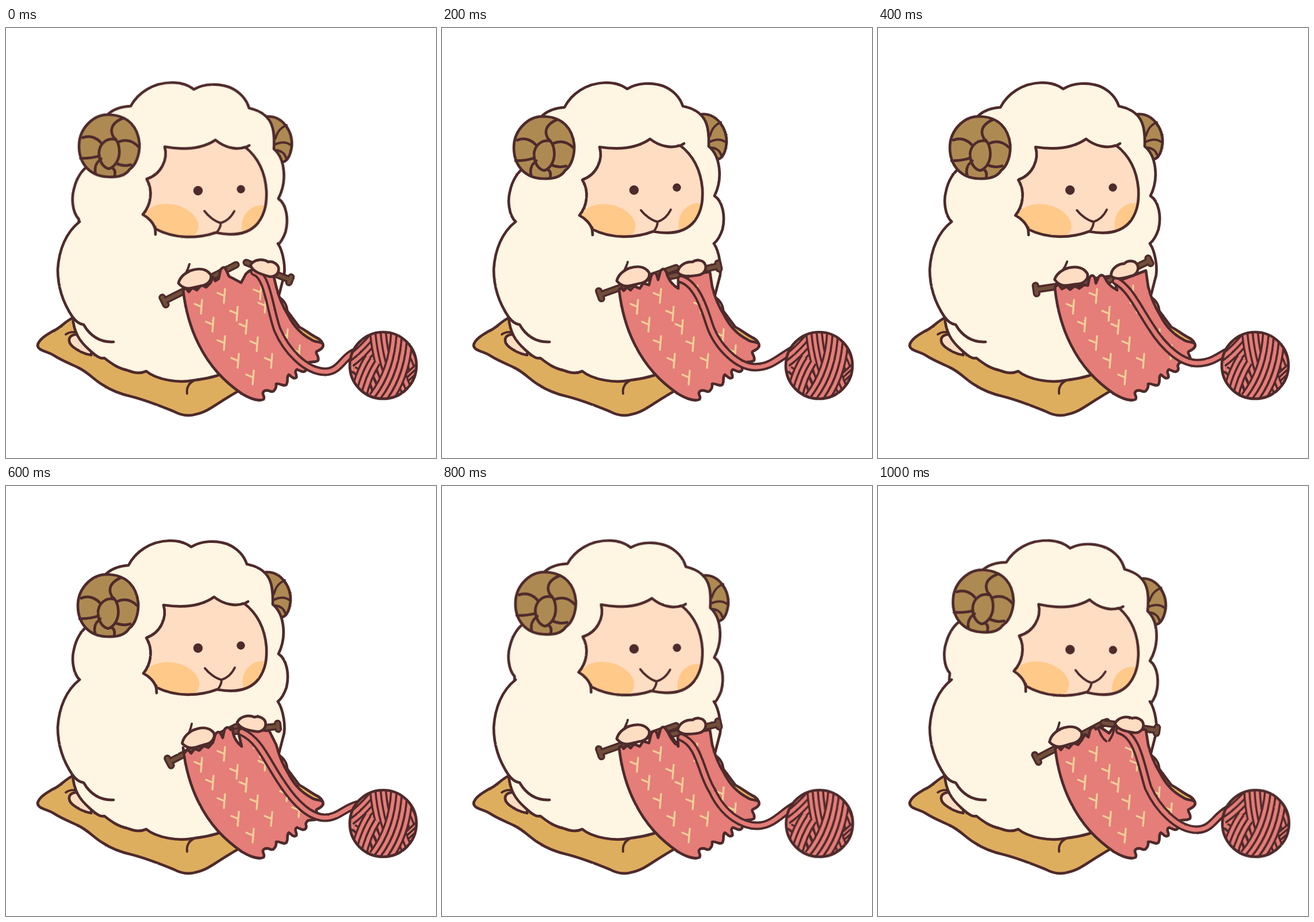
An HTML page that plays this animation: 748x748 px, repeating every 1200 ms.

```html
<!DOCTYPE html>
<html lang="en">
<head>
<meta charset="utf-8">
<title>Knitting sheep</title>
<style>
html, body { margin: 0; width: 100%; height: 100%; overflow: hidden; background: #fff; }
svg { display: block; width: 100%; height: 100%; }
.ink { stroke: #4e2a2b; stroke-width: 4.7; stroke-linecap: round; stroke-linejoin: round; fill: none; }
.wool { fill: #fff5e3; }
.skin { fill: #ffddc3; }
.horn { fill: #ae8a53; }
.mat { fill: #deae5f; }
.knit { fill: #e57d78; }
.dot { fill: #4e2a2b; }
.blush { fill: #ffc98a; }
.thin { stroke-width: 3.9; }
.stitch { fill: none; stroke: #f0cf98; stroke-width: 3.4; stroke-linecap: round; }
.rod, .yarn { fill: none; stroke-linecap: round; stroke-linejoin: round; }
.rod { stroke: #704f3a; stroke-width: 6; }
.rod.edge { stroke: #4e2a2b; stroke-width: 13; }
.yarn { stroke: #e57d78; stroke-width: 7; }
.yarn.edge { stroke: #4e2a2b; stroke-width: 15; }
.head { transform-origin: 295px 285px; animation: tilt 1.2s step-end infinite; }
.ball { transform-origin: 656px 587px; animation: nudge 1.2s step-end infinite; }
.pose { visibility: hidden; animation: show 1.2s step-end infinite; }
@keyframes tilt {
  0% { transform: rotate(1.5deg); }
  16.6667% { transform: rotate(0deg); }
  66.6667% { transform: rotate(2deg); }
  83.3333%, 100% { transform: rotate(3.9deg); }
}
@keyframes nudge {
  0% { transform: none; }
  66.6667% { transform: translate(.6px, 0) rotate(1.5deg); }
  83.3333%, 100% { transform: translate(1px, 0) rotate(2.5deg); }
}
@keyframes show {
  0% { visibility: visible; }
  16.6667%, 100% { visibility: hidden; }
}
</style>
</head>
<body>
<svg viewBox="0 0 748 748">
  <defs>
    <filter id="rough" x="0" y="0" width="748" height="748" filterUnits="userSpaceOnUse" color-interpolation-filters="sRGB">
      <feTurbulence type="fractalNoise" baseFrequency=".25" numOctaves="2" seed="4"/>
      <feDisplacementMap in="SourceGraphic" scale="1.6" xChannelSelector="R" yChannelSelector="G"/>
    </filter>
    <path id="face" d="M274 207C281 230 268 256 244 264C257 285 252 310 239 326C249 331 258 340 261 350C295 367 335 366 367 354C400 360 425 355 440 335C452 318 454 300 453 280C450 245 435 220 414 204C400 210 378 206 362 193C335 212 300 211 274 207Z"/>
    <clipPath id="faceClip"><use href="#face"/></clipPath>
    <clipPath id="ballClip"><circle cx="656" cy="587" r="57"/></clipPath>
    <path id="stitch" class="stitch" d="M-10 -3L2 2M3 -10L1 14"/>
    <g id="leftHand">
      <path class="ink skin" d="M304 440C306 431 314 423 325 418C340 413 353 415 360 425C363 433 356 442 346 444C330 446 318 456 304 440Z"/>
      <path class="ink thin" d="M317 422Q321 415 323 407"/>
    </g>
    <path id="rightHand" class="ink skin" d="M410 425C412 412 425 406 436 407C442 402 455 403 458 412C461 420 455 429 445 430C432 432 418 434 410 425Z"/>
  </defs>

  <g filter="url(#rough)">
    <!-- cushion and foot -->
    <path class="ink mat" d="M118 503C100 512 95 522 82 527C72 533 57 541 55 552C56 562 72 562 84 570C98 579 110 583 124 590C142 598 152 611 167 620C185 632 200 637 218 641C245 648 270 658 292 667C305 674 317 676 330 672C350 668 365 655 385 643C430 615 500 580 548 556C553 549 550 545 543 540C530 534 522 526 510 520L480 480Z"/>
    <path class="ink thin" d="M104 533Q111 528 119 529"/>
    <path class="ink skin" d="M125 533C107 533 106 546 117 555C126 562 136 567 148 569L150 545Z"/>

    <!-- wool -->
    <g class="head">
      <path class="ink horn" d="M450 150C478 147 496 175 495 200C493 218 487 229 476 229L450 210Z"/>
      <path class="ink thin" d="M485 164C472 170 469 178 466 188M494 199Q482 190 466 198M486 222Q482 209 468 208"/>
      <path class="ink wool" d="M128 352L128 337C116 325 114 300 118 285C122 265 132 250 143 243L175 152C185 143 197 139 213 138C225 115 250 96 285 95C300 95 313 99 322 106C340 95 365 94 385 101C402 108 414 121 419 136C440 140 456 151 461 170C465 185 464 195 464 206C484 222 489 262 474 292C489 302 493 328 488 350C484 362 479 370 473 375"/>
    </g>
    <path class="ink wool" d="M473 375C482 388 488 420 482 437L474 468C485 474 490 485 489 497L385 598C370 605 350 610 325 613C300 618 262 612 244 597C235 601 225 601 213 596C195 592 185 585 171 574C165 576 158 572 145 560C128 545 118 530 116 503C99 478 90 450 90 420C92 385 105 355 128 337"/>
    <path class="ink" d="M116 503Q125 515 135 516C146 535 162 547 187 546"/>
    <path class="ink thin" d="M328 613Q313 620 315 636"/>

    <!-- face and near horn -->
    <g class="head">
      <use href="#face" class="skin"/>
      <g clip-path="url(#faceClip)" class="blush">
        <ellipse cx="289" cy="339" rx="48" ry="32" transform="rotate(12 289 339)"/>
        <ellipse cx="441" cy="338" rx="29" ry="34" transform="rotate(20 441 338)"/>
      </g>
      <use href="#face" class="ink"/>
      <path class="ink" d="M261 347L262 360M414 205L421 201"/>
      <circle class="dot" cx="334" cy="282" r="8.2"/>
      <circle class="dot" cx="408.5" cy="277.5" r="7.2"/>
      <path class="ink thin" d="M346 317C353 326 365 335 375 337C385 334 393 326 398 316M375 337Q375 346 368 354"/>
      <path class="ink horn" d="M178 154C150 152 125 178 125 208C125 240 145 261 175 262C195 263 208 258 214 248C225 240 231 222 230 203C227 175 210 155 178 154Z"/>
      <path class="ink" d="M131 195C143 190 155 194 164 204M201 159C184 166 176 177 184 192L189 197C172 193 160 206 160 221C161 236 168 246 178 248C191 243 197 228 195 213Q194 204 189 197M193 201Q213 192 229 209M128 231Q146 231 161 226M164 231Q151 241 155 257M190 238Q203 244 216 240M183 246Q191 249 188 261"/>
    </g>

    <g id="poses"></g>

    <g class="ball">
      <circle class="knit" cx="656" cy="587" r="58"/>
      <g id="strands" clip-path="url(#ballClip)"></g>
      <circle class="ink" cx="656" cy="587" r="58"/>
    </g>
  </g>
</svg>
<script>
const side = 'C474 466 481 484 491 500C500 518 514 533 531 542C537 547 545 545 551 549C554 556 546 560 540 563C538 567 545 570 543 578C540 582 532 580 525 582C518 590 524 588 522 595C518 601 512 596 506 594C500 598 507 603 505 608';
const hem = 'C500 612 496 605 492 603C487 608 492 612 488 620C483 625 476 617 470 619C470 624 470 627 466 631C462 636 458 628 450 631C442 636 452 640 448 646C440 650 425 645 410 636C380 615 355 590 335 550C320 520 312 490 308 455Z';
const marks = [[338, 483], [378, 464], [358, 514], [400, 495], [416, 518], [378, 546], [435, 548],
  [402, 577], [460, 577], [428, 606], [441, 458], [449, 481], [487, 534], [508, 562]];

const path = (cls, d) => `<path class="${cls}" d="${d}"/>`;
const outlined = (cls, d) => path(cls + ' edge', d) + path(cls, d);

// Shaft from its knob (x, y) to its tip (u, v)
function needle([x, y, u, v], size) {
  const len = Math.hypot(u - x, v - y);
  const nx = -(v - y) / len * size, ny = (u - x) / len * size;
  return outlined('rod', `M${x} ${y}L${u} ${v}M${x - nx} ${y - ny}L${x + nx} ${y + ny}`);
}

const at = (id, move) => `<use href="#${id}" transform="${move}"/>`;

const loopsMid = 'M308 455L312 452L316 457L322 451L328 456L334 449L344 453L350 444L360 447L364 431Q370 421 374 431L376 438L380 423Q385 415 390 424';
const knobs = { left: [275, 464, 407, 417], right: [481, 414, 398, 432] };

const poses = [
  { left: [275, 475, 400, 412], right: [494, 438, 418, 408],
    lh: 'translate(-4 4)', rh: 'translate(16 -2) rotate(25 434 418)',
    top: 'M308 455L313 453L318 459L324 452L332 456L340 447L348 451L356 443L360 433L364 440L370 436L373 421Q379 412 383 421L388 432L409 443L417 428Q428 416 440 422L466 433L470 450',
    yarn: 'M432 424C455 430 459 490 472 525C487 560 520 597 555 598C582 598 585 570 612 562' },
  { ...knobs, lh: '', rh: '',
    top: loopsMid + 'Q395 444 411 453L411 440Q430 430 466 424L470 450',
    yarn: 'M416 437C441 445 454 480 465 515C478 555 515 590 545 590C572 590 585 574 610 560' },
  { left: [275, 455, 402, 436], right: [472, 405, 400, 440],
    lh: 'translate(4 0) rotate(5 332 430)', rh: 'translate(-6 3) rotate(-8 434 418)',
    top: 'M308 450L314 446L320 454L328 450L334 455L342 449L350 453L358 447L365 448L368 434Q373 427 377 434L379 444L384 433Q390 426 395 435Q400 448 416 456L412 442Q430 436 466 422L470 450',
    yarn: 'M414 440C437 452 450 482 475 520C500 560 530 583 555 583C580 583 590 572 610 562' },
  { left: [284, 480, 400, 419], right: [473, 418, 388, 428],
    lh: 'translate(2 6) rotate(-4 332 434)', rh: 'translate(-7 -6) rotate(18 434 418)',
    top: 'M310 465L316 458L322 465L328 457L336 460L344 452L352 455L360 446L364 432Q370 424 374 432L377 438L380 424Q385 416 391 424L394 420Q394 440 410 453L404 428Q425 422 458 426L470 450',
    yarn: 'M410 428C442 442 454 480 482 520C504 553 530 577 555 577C578 577 588 560 612 554' },
  { ...knobs, lh: '', rh: '',
    top: loopsMid + 'L404 442L411 453L410 436Q430 430 466 424L470 450', strand: 'M392 427Q398 441 406 449',
    yarn: 'M416 437C449 450 450 500 470 530C490 574 525 592 550 591C575 590 590 570 610 558' },
  { left: [276, 474, 398, 410], right: [485, 425, 392, 412],
    lh: 'translate(-6 4) rotate(-3 332 434)', rh: 'translate(3 -4) rotate(18 434 418)',
    top: 'M308 457L313 453L318 459L324 452L332 456L340 447L348 450L355 441L360 432L366 437L369 424Q375 416 379 423L386 419L402 430L411 418Q440 422 466 424L470 450',
    strand: 'M384 424Q389 438 397 444M411 421Q409 434 402 443',
    yarn: 'M420 425C452 434 458 488 470 525C486 560 520 598 555 598C582 597 585 575 610 562' }
];

document.getElementById('poses').innerHTML = poses.map((p, i) =>
  `<g class="pose" style="animation-delay:${i * 200 - 1200}ms">` +
  needle(p.left, 7) + needle(p.right, 5) +
  path('ink knit', p.top + side + hem) +
  marks.map(([x, y]) => at('stitch', `translate(${x} ${y})`)).join('') +
  path('ink thin', p.strand || '') +
  outlined('yarn', p.yarn) +
  at('leftHand', p.lh) + at('rightHand', p.rh) + '</g>').join('');

// Bundles of parallel curves: start, bend, end, step, count
const bundles = [
  [[600, 572], [618, 560], [646, 526], [3, 10], 6],
  [[690, 526], [712, 560], [722, 590], [-7, 4], 3],
  [[724, 582], [704, 600], [668, 634], [-2, 10], 5],
  [[596, 600], [616, 610], [628, 652], [9, -6], 4],
  [[638, 526], [642, 585], [668, 640], [9, -1], 5],
  [[604, 640], [612, 600], [630, 572], [8, 5], 3],
  [[702, 536], [700, 605], [664, 652], [-9, -4], 4]
];
document.getElementById('strands').innerHTML = bundles.map(([a, b, c, [dx, dy], n]) =>
  Array.from({ length: n }, (_, i) => {
    const p = ([x, y]) => `${x + dx * i} ${y + dy * i}`;
    const d = `M${p(a)}Q${p(b)} ${p(c)}`;
    return `<path d="${d}" fill="none" stroke="#4e2a2b" stroke-width="13"/>` +
      `<path d="${d}" fill="none" stroke="#e57d78" stroke-width="6"/>`;
  }).join('')).join('');
</script>
</body>
</html>
```
